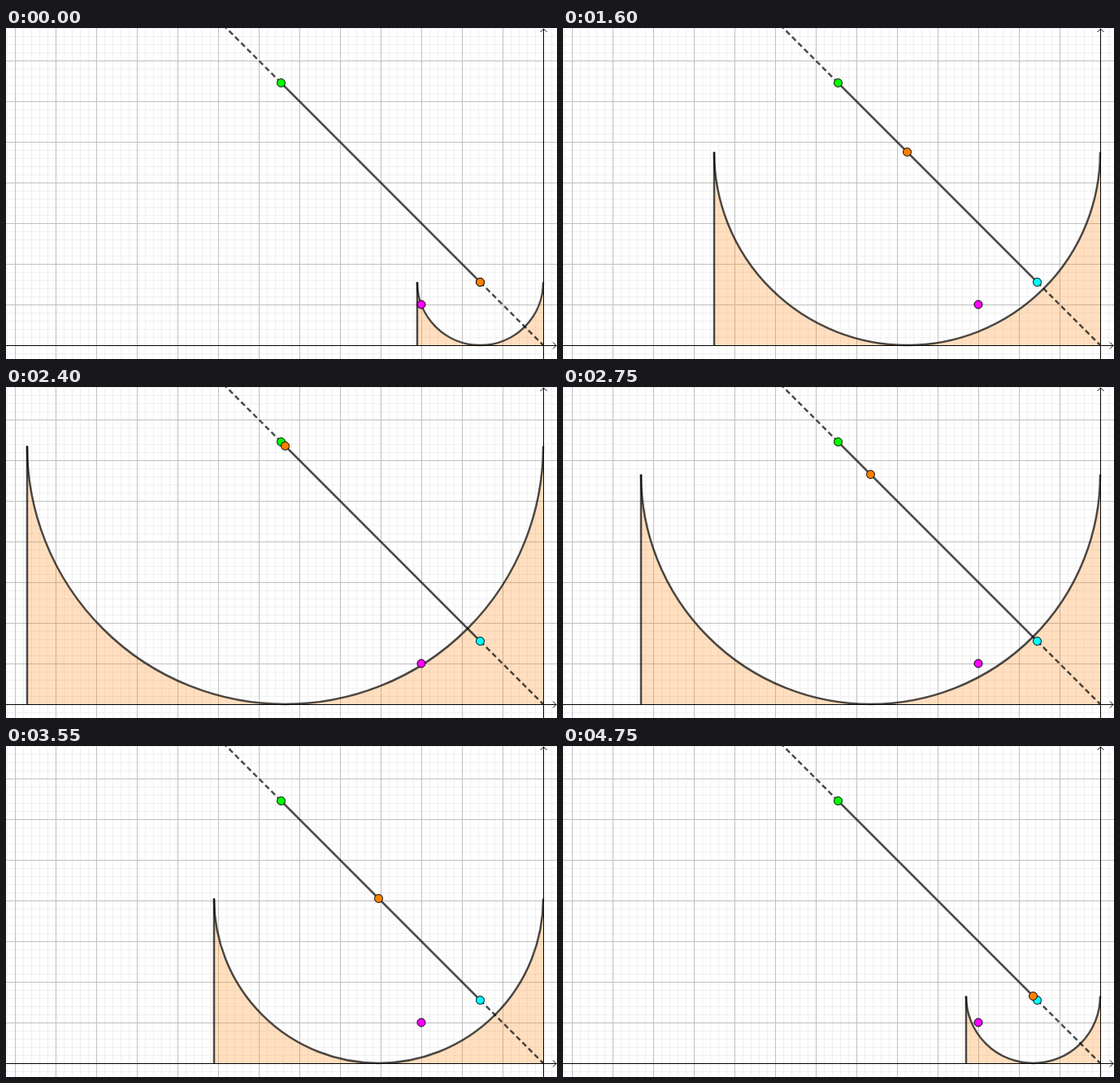
Recreate the animation shown at these times as an HTML page with a canvas. Size 678 by 407 pixels, loop 4800 ms.

```html
<!DOCTYPE html>
<html lang="en">
<head>
<meta charset="utf-8">
<title>Growing semicircle</title>
<style>
  html, body { margin: 0; width: 100%; height: 100%; overflow: hidden; background: #fff; }
  canvas { display: block; }
</style>
</head>
<body>
<canvas id="stage" width="678" height="407"></canvas>
<script>
const W = 678, H = 407;
const OX = 661, OY = 390;           // origin of the axes
const R_MIN = 77.5, R_MAX = 322.5;  // fixed points on the diagonal
const STEP_MS = 50, STEPS = 96, GROWTH = 5;
const INK = 'rgba(0,0,0,0.7)';
const ctx = document.getElementById('stage').getContext('2d');

function path(points, color, width, dash = []) {
  ctx.beginPath();
  points.forEach(([x, y]) => ctx.lineTo(x, y));
  ctx.strokeStyle = color;
  ctx.lineWidth = width;
  ctx.setLineDash(dash);
  ctx.stroke();
  ctx.setLineDash([]);
}

function grid(gap, color, skip) {
  for (let x = OX % gap; x < W; x += gap) {
    if (!skip || (OX - x) % skip) path([[x + 0.5, 0], [x + 0.5, H]], color, 1);
  }
  for (let y = OY % gap; y < H; y += gap) {
    if (!skip || (OY - y) % skip) path([[0, y + 0.5], [W, y + 0.5]], color, 1);
  }
}

function axes() {
  const x = OX + 0.5, y = OY + 0.5;
  path([[0, y], [W - 1, y]], '#000', 1);
  path([[W - 5, y - 4], [W - 1, y], [W - 5, y + 4]], '#000', 1);
  path([[x, H], [x, 1]], '#000', 1);
  path([[x - 4, 5], [x, 1], [x + 4, 5]], '#000', 1);
}

const diagonal = d => [OX - d, OY - d];

function dot([x, y], color) {
  ctx.beginPath();
  ctx.arc(x, y, 5, 0, Math.PI * 2);
  ctx.fillStyle = color;
  ctx.fill();
  ctx.strokeStyle = '#000';
  ctx.lineWidth = 1;
  ctx.stroke();
}

function bowl(r) {
  const left = OX - 2 * r, top = OY - r;
  const arc = () => ctx.arc(OX - r, top, r, Math.PI, 0, true);

  ctx.beginPath();
  ctx.moveTo(left, OY);
  arc();
  ctx.lineTo(OX, OY);
  ctx.closePath();
  ctx.fillStyle = 'rgba(255,127,0,0.25)';
  ctx.fill();

  path([[left, OY], [left, top]], INK, 2.5);
  ctx.beginPath();
  arc();
  ctx.stroke();
}

function draw(time) {
  const step = Math.floor(time / STEP_MS) % STEPS;
  const r = R_MIN + GROWTH * Math.min(step, STEPS - step);

  ctx.fillStyle = '#fff';
  ctx.fillRect(0, 0, W, H);
  grid(10, '#f0f0f0', 50);
  grid(50, '#c0c0c0');
  axes();
  bowl(r);

  ctx.lineCap = 'butt';
  path([diagonal(R_MIN), diagonal(0)], INK, 2.5, [6.5, 4]);
  path([diagonal(R_MAX), diagonal(400)], INK, 2.5, [6.5, 4]);
  path([diagonal(R_MIN), diagonal(R_MAX)], INK, 2.5);

  dot(diagonal(R_MIN), '#0ff');
  dot(diagonal(R_MAX), '#0f0');
  dot(diagonal(r), '#ff7f00');
  dot([OX - 150, OY - 50], '#f0f');
}

const start = performance.now();
function tick() {
  draw(performance.now() - start);
  requestAnimationFrame(tick);
}
tick();
</script>
</body>
</html>
```
